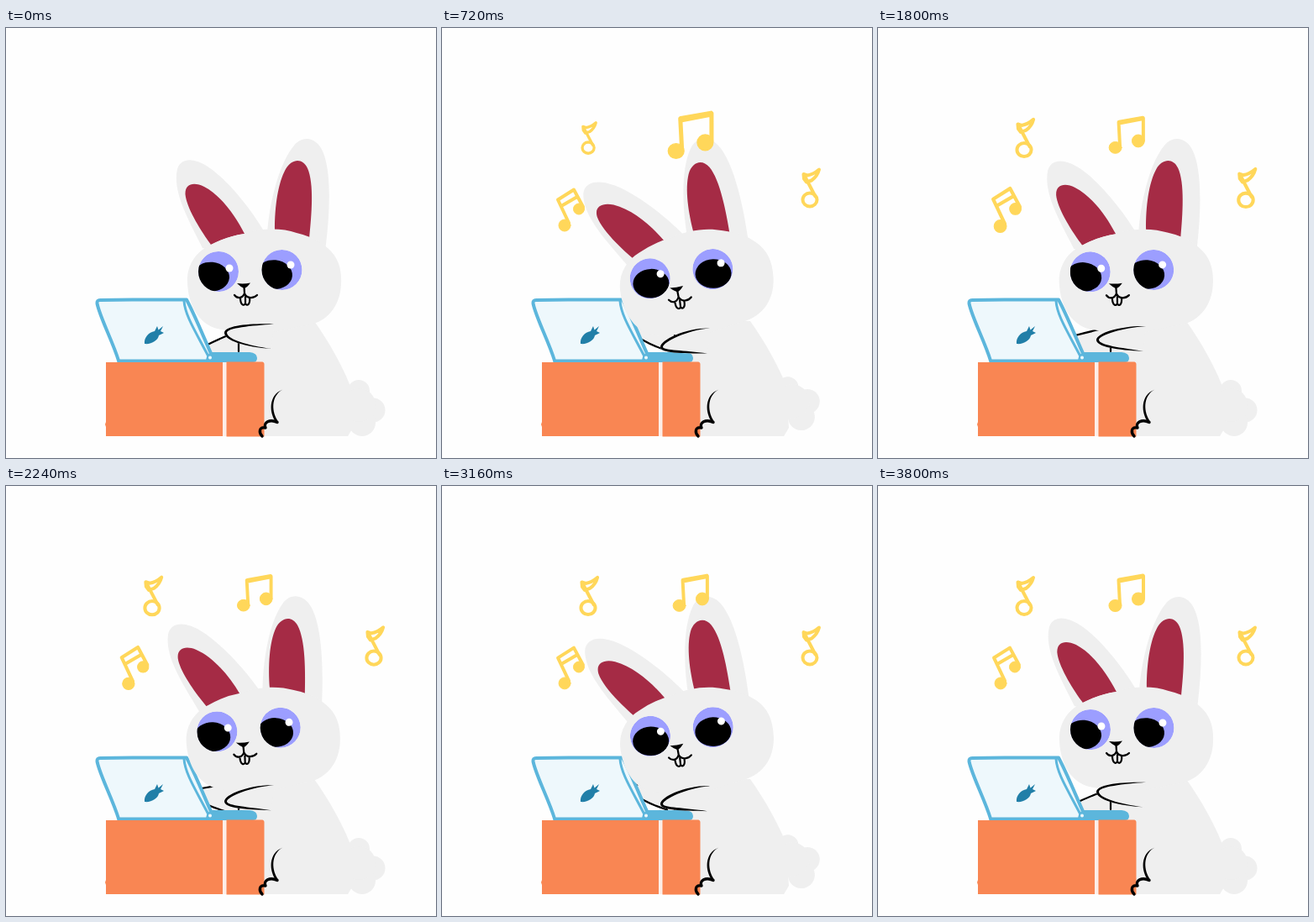
Write an HTML page that moves like this. It is 512 px wide and 512 px high and loops after 3.84 s.

```html
<!DOCTYPE html>
<html lang="en">
<head>
<meta charset="utf-8">
<title>Rabbit at a laptop</title>
<style>
  html, body { margin: 0; width: 100%; height: 100%; overflow: hidden; background: #fefefe; }
  svg { display: block; width: 100vw; height: 100vh; }
  .fur { fill: #efefef; }
  .ear { fill: #a52b45; }
  .iris { fill: #9c9eff; }
  .ink, .edge { fill: none; stroke-linecap: round; stroke-linejoin: round; }
  .ink { stroke: #000; stroke-width: 2.2; }
  .edge { stroke: #5cb6dc; stroke-width: 4; }
  .thin { stroke-width: 3; }
  .bold { stroke-width: 3.4; }
  .wood { fill: #f98653; }
  .note { fill: none; stroke: #ffd75a; stroke-width: 4; stroke-linecap: round; stroke-linejoin: round; }
  .note .solid { fill: #ffd75a; stroke-width: 1; }
</style>
</head>
<body>
<svg viewBox="0 0 512 512">
  <defs>
    <g id="eyeballs"><circle cx="253" cy="290" r="24"/><circle cx="328.5" cy="288" r="24"/></g>
    <clipPath id="eyes"><circle cx="253" cy="290" r="24"/><circle cx="328.5" cy="288" r="24"/></clipPath>
    <g id="quaver">
      <ellipse class="solid" cx="174" cy="145" rx="8.5" ry="8"/>
      <path d="M180.500 141L169 119"/>
      <path class="solid" d="M166.500 114.500L171 116Q178 115 185 109Q183 117 176 122L170 124L167 120Z"/>
    </g>
  </defs>

  <g id="tail" class="fur">
    <circle cx="420" cy="432" r="13"/><circle cx="437" cy="455" r="14.5"/>
    <circle cx="424" cy="470" r="16"/><circle cx="420" cy="449" r="20"/>
  </g>
  <path class="fur" d="M272 345L278 397L300 486H407L413 476L409 424C400 402 386 376 367 349Z"/>
  <path id="farFill" class="fur"/>
  <path id="farLine" class="ink"/>

  <g id="laptop">
    <path d="M109 324L215 323L247 396H134Z" fill="#eef8fc"/>
    <path class="edge" d="M134 396C127 373 112 345 108.500 328Q108 324 112 324L150 323.500L215 323.500C225 342 236 370 247 394M134 396.500H242"/>
    <path class="edge thin" d="M212 325C213 342 226 362 241 391"/>
    <path d="M244 386H290Q299 387 299 393Q299 398 294 398H238Q238 389 244 386Z" fill="#5cb6dc"/>
    <circle cx="243" cy="392.500" r="2" fill="#eef8fc"/>
    <path d="M165 376C164 369 170 362 177 361L180 355L181.500 359.500L187 355L184 361L188 363L182 366C181 372 173 377 165 376Z" fill="#217fa8"/>
  </g>

  <path class="wood" d="M119 398H259V486H119V475L118 472L119 469Z"/>
  <path fill="#fdeee8" d="M258 398H263V486H258Z"/>
  <path class="wood" d="M262.500 397.500H305.500Q307.500 398 307.500 400V486.500H262.500Z"/>
  <path d="M329.500 430.500C312 437 313 459 322 470L324.500 469C316 458 315 438 329.500 430.500Z"/>
  <path class="ink bold" d="M323 469.500C314 465 306 470 309 476C301 474 301 482 305 486"/>

  <g id="earL">
    <path class="fur" d="M234 262C216 226 198 194 204 168C209 153 226 155 243 167C267 184 294 219 309 245L284 275Z"/>
    <path class="ear" d="M244 258C231 240 215 214 213.500 198C213 185 224 183 236 189C257 200 274 225 284 245Q263 248 244 258Z"/>
  </g>
  <g id="earR">
    <path class="fur" d="M311 245C314 205 326 160 343 140C351 130 364 129 373 140C389 161 386 220 380 265L340 275Z"/>
    <path class="ear" d="M320 240C320 212 324 184 333 168C340 156 353 154 359 167C367 185 364 222 361 251Q342 241 320 240Z"/>
  </g>

  <g id="head">
    <path class="fur" d="M216 303C215 283 226 266 244 258Q263 248 284 245C304 238 328 238 346 244Q368 249 383 262C396 273 400 288 399 305C398 331 382 353 352 355L310 364C285 363 262 361 248 357C229 350 217 330 216 303Z"/>
    <g clip-path="url(#eyes)">
      <use href="#eyeballs" class="iris"/>
      <g id="pupils">
        <ellipse rx="21.500" ry="17.300" transform="translate(253.500 296)rotate(5)"/>
        <ellipse rx="21.500" ry="17.300" transform="translate(328.500 293.500)rotate(5)"/>
      </g>
    </g>
    <circle cx="266" cy="286" r="4.500" fill="#fff"/>
    <circle cx="339" cy="282" r="4.500" fill="#fff"/>
    <path d="M275 304Q283 305 291 303.500Q287 309 283.500 310Q279 308 275 304Z"/>
    <path class="ink" d="M283.500 308L284 316C281 323 275 322 272 318M284 316C287 323 295 322 299 318M279 321C279 331 284 331 285 328V320M285 328C287 332 291 329 290 321"/>
  </g>

  <path class="ink" d="M277 366V385"/>
  <path id="nearFill" class="fur"/>
  <path id="nearLine"/>

  <g class="note">
    <ellipse class="solid" cx="282.500" cy="142.500" rx="7.500" ry="7"/><ellipse class="solid" cx="310" cy="134.500" rx="7.500" ry="7.500"/>
    <path d="M288 141L286.500 112M316 133V107M287 113.500L316 108M287 111.500L315.500 106.500"/>
  </g>
  <g class="note">
    <circle class="solid" cx="146" cy="235" r="7"/><circle class="solid" cx="163" cy="215.500" r="6.500"/>
    <path d="M151 232L138 204.500L157 192.500L168 213M142 212L161 201"/>
  </g>
  <g class="note"><use href="#quaver"/></g>
  <g class="note"><use href="#quaver" transform="translate(264 59.500)"/></g>
</svg>

<script>
const LOOP = 3840, SWAY = 1920, TAP = 480, STEP = 40;
const $ = id => document.getElementById(id);
const wave = (t, period) => (1 - Math.cos(2 * Math.PI * t / period)) / 2;
const smooth = (t, a, b) => {
  const x = Math.min(1, Math.max(0, (t - a) / (b - a)));
  return x * x * (3 - 2 * x);
};

// Centre, birth time, strength and phase of the swell
const notes = [
  { x: 297, y: 127, born: 320, swell: .26, phase: 0 },
  { x: 153, y: 217, born: 440, swell: .27, phase: Math.PI / 2 },
  { x: 174.5, y: 131, born: 400, swell: -.17, phase: 0 },
  { x: 438.5, y: 190.5, born: 520, swell: .12, phase: Math.PI / 2 }
];
const noteEls = document.querySelectorAll('.note');

// Pops in, then settles like a damped spring
function noteScale({ born, swell, phase }, t) {
  const u = t - 720;
  return smooth(t, born, born + 200) * (1 + swell * Math.exp(-u / 700) * Math.cos(u * Math.PI / 2000 - phase));
}

function turn(id, k, angle, cx, cy, dx = 0, dy = 0) {
  $(id).setAttribute('transform', `translate(${dx * k} ${dy * k})rotate(${angle * k} ${cx} ${cy})`);
}

function drawNearArm(k) {
  const top = 352.5 + 5 * k, tip = 363 + 17 * k, end = 382 + 5.5 * k;
  const out = `M319,${top}C292,${top - 1} 260,${tip - 9} 260,${tip}C260,${tip + 9 - k * 2} 285,${end - 2 + k * 2} 316,${end}`;
  const back = `C288,${end - 4} 264,${tip + 8 - k * 4} 263,${tip}C263,${tip - 6} 292,${top + 2} 319,${top}Z`;
  $('nearFill').setAttribute('d', out + 'Z');
  $('nearLine').setAttribute('d', out + back);
}

function drawFarArm(k) {
  const top = `${236 - 6 * k},${379 - 25 * k}Q250,${372 - 20 * k} ${264 + 8 * k},${366 - 16 * k}`;
  const low = 404 - 20 * k, wrist = 402 - 31 * k;
  const under = `M268,${low}Q252,${low - 5 * k} 238,${wrist}`;
  $('farFill').setAttribute('d', `${under}L${top}L290,360V390Z`);
  $('farLine').setAttribute('d', `${under}M${top}`);
}

function draw(t) {
  const lean = wave(t, SWAY) / .854;
  const tap = wave(t, TAP);
  const phase = t % SWAY;

  turn('earL', lean, -14, 264, 251, -17.5, 13);
  turn('earR', lean, -15.5, 340, 245, -19, 1);
  turn('head', lean, -7, 308, 300, -4.5, 1.5);
  turn('tail', smooth(phase, 580, 680) - smooth(phase, 1320, 1420), -19, 405, 455);
  $('pupils').setAttribute('transform', `translate(${-9 * Math.max(0, 1 - lean)} 0)`);

  drawNearArm(tap);
  drawFarArm(tap);

  notes.forEach((note, i) => {
    const { x, y } = note, s = noteScale(note, t);
    noteEls[i].setAttribute('transform', `translate(${x} ${y})scale(${s})translate(${-x} ${-y})`);
    noteEls[i].style.display = s ? '' : 'none';
  });
}

let start;
function tick() {
  const now = performance.now();
  start ??= now;
  draw(Math.floor((now - start) % LOOP / STEP) * STEP);
  requestAnimationFrame(tick);
}
tick();
</script>
</body>
</html>
```
